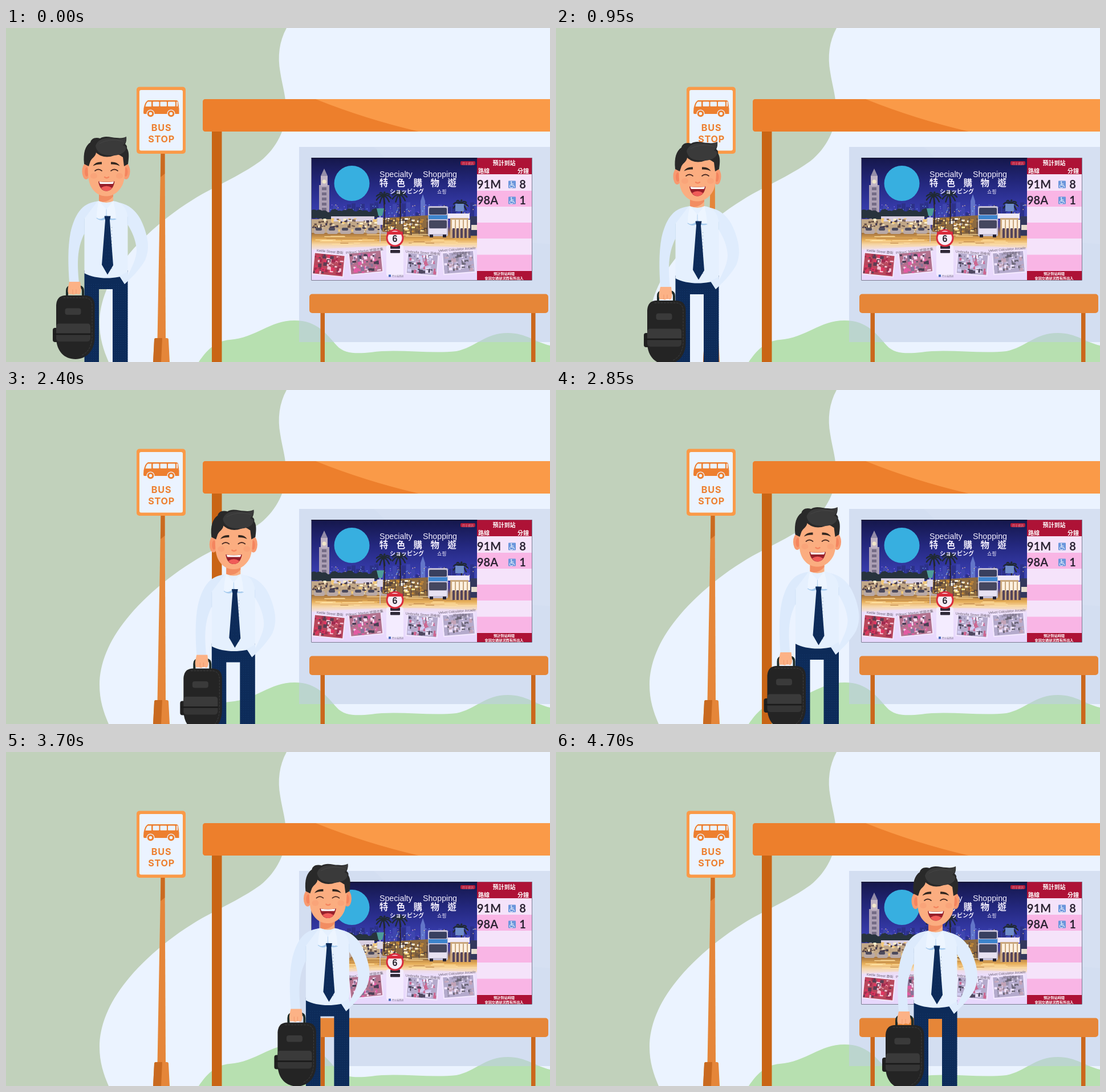
These frames come from a looping animation (954x587 px, 6000 ms). An HTML page with a canvas:

```html
<!DOCTYPE html>
<html lang="en">
<head>
<meta charset="utf-8">
<title>Bus stop</title>
<style>
html, body { margin: 0; width: 100%; height: 100%; overflow: hidden; background: #ebf3ff; }
canvas { display: block; width: 954px; height: 587px; }
</style>
</head>
<body>
<canvas id="stage" width="954" height="587"></canvas>
<script>
const W = 954, H = 587, LOOP = 6000, STEP = 50;
const stage = document.getElementById('stage').getContext('2d');
const scene = document.createElement('canvas');
scene.width = W;
scene.height = H;
let g = scene.getContext('2d');

const CJK = '"Noto Sans CJK TC", "Noto Sans CJK", "Noto Sans CJK JP", sans-serif';
const ARIAL = '"Liberation Sans", Arial, sans-serif';

function fill(d, color) {
  g.fillStyle = color;
  g.fill(new Path2D(d));
}
function line(d, color, width) {
  g.strokeStyle = color;
  g.lineWidth = width;
  g.lineCap = 'round';
  g.stroke(new Path2D(d));
}
function rect(x, y, w, h, color, r = 0) {
  g.fillStyle = color;
  g.beginPath();
  g.roundRect(x, y, w, h, r);
  g.fill();
}
function oval(x, y, rx, ry, color) {
  g.fillStyle = color;
  g.beginPath();
  g.ellipse(x, y, rx, ry, 0, 0, Math.PI * 2);
  g.fill();
}
function text(s, x, y, font, color, align = 'left', spacing = 0) {
  g.font = font;
  g.fillStyle = color;
  g.textAlign = align;
  g.letterSpacing = spacing + 'px';
  g.fillText(s, x, y);
}
function seeded(seed) {
  return () => (seed = (seed * 16807) % 2147483647) / 2147483647;
}
function vertical(y0, y1, ...stops) {
  const grad = g.createLinearGradient(0, y0, 0, y1);
  stops.forEach(([at, color]) => grad.addColorStop(at, color));
  return grad;
}

function drawLandscape() {
  rect(0, 0, W, H, '#ebf3ff');
  fill('M492 0C479 24 476 50 481 78C485 104 492 122 491 150C490 176 476 210 446 234C420 253 385 270 355 286C300 315 245 360 211 403C180 441 164 482 164 518C164 545 171 566 180 587H0V0Z', '#c1d1bb');
  fill('M338 587C352 566 368 550 392 548C440 544 462 514 506 514C546 514 562 538 580 558C594 574 618 572 640 570C685 563 740 573 790 568C824 561 840 536 880 536C912 536 930 553 954 558V587Z', '#b7e0b0');
}

function drawShelter() {
  rect(514, 209, 440, 343, 'rgba(190,203,228,.47)');
  fill('M514 209H645C690 250 760 340 860 366C900 376 925 378 954 380V552H514Z', 'rgba(190,206,232,.14)');
  rect(361, 180, 17.5, 407, '#c96515');
  rect(345, 125, 640, 57, '#fa9a48', 5);
  fill('M350 125H543Q630 160 724 182H350Q345 182 345 177V130Q345 125 350 125Z', '#ed7f2c');
}

function drawBench() {
  rect(551.5, 498, 7.5, 89, '#cb671b');
  rect(921, 498, 7.5, 89, '#cb671b');
  rect(532, 467.5, 419, 33.5, '#e68638', 5);
}

function drawSign() {
  const orange = '#ed7f2f', pale = '#ebf3ff';
  fill('M271.5 220H278.5L280 548H265.5Z', '#e58639');
  fill('M271.5 220H278.5V256L271 262Z', '#ca6a20');
  fill('M263 545H282Q285 545 285 548L287 587H258L260 548Q260 545 263 545Z', '#e58639');
  fill('M263 545H274L272 587H258L260 548Q260 545 263 545Z', '#c96a20');
  rect(229, 103.5, 86, 117.5, '#fa9a48', 5);
  rect(234, 109, 76, 106.5, pale, 3);
  fill('M249 127H298Q302 127 302 131L303.5 142V151H242Q241 151 241 148L241.5 141Q244 129 249 127Z', orange);
  fill('M249 129.5H255V138H244.5Q246 131 249 129.5Z', pale);
  [257.5, 270.5, 284].forEach((x, i) => rect(x, 129.5, [11, 11.5, 13][i], 8.2, pale, 1));
  rect(299, 129.5, 2, 8.2, pale);
  for (const x of [253.5, 289.5]) {
    oval(x, 150.5, 7, 7, pale);
    oval(x, 150.5, 5.8, 5.8, orange);
    oval(x, 150.5, 2.7, 2.7, pale);
  }
  text('BUS', 272.6, 181, '700 16.2px Inter, sans-serif', orange, 'center', .8);
  text('STOP', 272.6, 201, '700 16.2px Inter, sans-serif', orange, 'center', .8);
}

function palm(x, y, h) {
  line(`M${x} ${y}q3 ${h / 2} 1 ${h}`, '#2b2330', 2);
  for (let a = 0; a < 9; a++) {
    const dx = Math.cos(a * .7) * 13, dy = Math.sin(a * .7) * 10;
    line(`M${x} ${y}q${dx / 2} ${dy / 2 - 5} ${dx} ${dy + 3}`, '#202a32', 2.4);
  }
}

function drawThumb(x, y, w, h, turn, tones, label, lx, ly) {
  const rnd = seeded(x * 7 + 3);
  g.save();
  g.translate(x, y);
  g.rotate(turn);
  rect(-w / 2 - 2, -h / 2 - 2, w + 4, h + 4, '#f3e8ff');
  rect(-w / 2, -h / 2, w, h, tones[0]);
  for (let i = 0; i < 90; i++) {
    const bw = 2 + rnd() * 5, bh = 2 + rnd() * 5;
    rect(-w / 2 + rnd() * (w - bw), -h / 2 + rnd() * (h - bh), bw, bh, tones[i % tones.length]);
  }
  g.restore();
  g.save();
  g.translate(lx, ly);
  g.rotate(turn);
  text(label, 0, 0, `6px ${ARIAL}`, '#6b6070', 'center');
  g.restore();
}

function drawPhoto() {
  const rnd = seeded(91);
  g.save();
  g.beginPath();
  g.rect(536, 228.5, 290, 214.5);
  g.clip();
  rect(536, 228, 290, 215, vertical(228, 443, [0, '#15174a'], [.2, '#23277c'], [.46, '#3a3fb4'],
    [.56, '#4d4599'], [.62, '#a8763f'], [.67, '#e8b05a'], [.71, '#f6d6a8'], [.76, '#f0e2f6'], [1, '#dfcbf8']));

  for (let x = 566; x < 826; x += 8) {
    const h = 10 + rnd() * 22;
    rect(x, 338 - h, 7, h, rnd() > .5 ? '#3e46ae' : '#2c3189');
  }
  rect(727, 304, 8, 34, '#6275c8');
  fill('M727 304L731 292L735 304Z', '#6275c8');
  for (let i = 0; i < 150; i++) {
    rect(566 + rnd() * 258, 310 + rnd() * 29, 1.4, 1.4, ['#78a9f0', '#e7c488', '#8a66ee'][i % 3]);
  }

  rect(549, 276, 18, 62, '#ab9fb4');
  rect(552, 260, 12, 18, '#c0b3c4');
  fill('M552 260L558 247L564 260Z', '#938ca8');
  for (let y = 280; y < 330; y += 9) rect(554, y, 8, 5, '#756c86');
  oval(558, 270, 3.5, 3.5, '#f1e6cb');

  for (let x = 540; x < 650; x += 9) oval(x, 325 + rnd() * 8, 8, 8, '#27333d');
  rect(536, 336, 120, 24, '#c2a888');
  rect(570, 331, 76, 9, '#d8cfe2');
  for (let i = 0; i < 90; i++) {
    rect(537 + rnd() * 115, 334 + rnd() * 22, 2 + rnd() * 4, 1.5 + rnd() * 3, ['#fff0cc', '#6a5348', '#f2c878', '#453c50'][i % 4]);
  }
  for (let x = 540; x < 660; x += 23) {
    rect(x, 353, 19, 9, '#b9a9a6', 3);
    rect(x + 3, 351, 11, 5, '#4c4a5c', 2);
  }
  fill('M660 334L742 329V366L660 358Z', '#8d6a40');
  for (let i = 0; i < 80; i++) {
    rect(661 + rnd() * 78, 334 + rnd() * 24, 2 + rnd() * 5, 1 + rnd() * 3, ['#ffdf8a', '#51403a', '#f7efe0', '#c98c38'][i % 4]);
  }
  for (let x = 668; x < 742; x += 14) rect(x, 334, 1, 30, '#433846');
  for (let i = 0; i < 34; i++) {
    rect(540 + rnd() * 260, 361 + rnd() * 19, 16 + rnd() * 30, 1.2, i % 3 ? '#ffe0a0' : '#c18a4a');
  }

  palm(662, 296, 54);
  palm(690, 294, 50);
  palm(797, 310, 30);
  line('M656 318V376', '#cfc7da', 1.5);
  fill('M650 317H663L660 330H653Z', '#4c9d9a');
  rect(651, 333, 10, 13, '#dcd7e8');

  rect(740, 313, 35, 53, '#c4bfd6', 3);
  rect(742, 316, 31, 12, '#39405f', 2);
  rect(741, 329, 33, 7, '#3d84cc');
  rect(742, 338, 31, 14, '#45475f', 2);
  rect(742, 353, 31, 9, '#e8e2f2');
  rect(743, 363, 6, 5, '#262332');
  rect(766, 363, 6, 5, '#262332');
  rect(775, 326, 38, 9, '#efe8f8');
  rect(779, 334, 32, 35, '#c8a57c');
  for (let x = 782; x < 811; x += 7) {
    rect(x, 337, 5, 17, '#fdf0e0');
    rect(x + 1, 352, 4, 17, '#55445a');
  }
  rect(788, 309, 15, 13, '#6f8dca');
  rect(814, 331, 12, 34, '#33385d');
  rect(816, 346, 10, 9, '#e8dcce');

  fill('M536 390Q680 378 826 387V443H536Z', 'rgba(236,222,255,.65)');
  drawThumb(566, 416, 52, 36, .1, ['#b8485c', '#e03560', '#5c3c52', '#f6c5d6', '#a02c50'], 'Kettle Street 壺街', 568, 395);
  drawThumb(631, 412, 55, 36, -.1, ['#b3728e', '#e35ba3', '#4c4056', '#f6d8ee', '#8a7298'], 'Pillows’ Market 枕頭市集', 629, 394);
  drawThumb(730, 415, 52, 35, .08, ['#b5abcc', '#f0e6fc', '#4f4860', '#cd6690', '#d0cbf0'], 'Umbrella Street 雨傘街', 731, 397);
  drawThumb(794, 412, 53, 36, -.08, ['#b4aacc', '#f0e4fc', '#696475', '#c4a4b8', '#9992ac'], 'Velvet Calculator Arcade', 791, 391);
  text('絨絨電算商場', 799, 397, `5px ${CJK}`, '#6b6070', 'center');

  rect(667, 382, 30, 54, '#f4ecff', 3);
  rect(674, 382.5, 17, 5.5, '#2f2938', 1);
  rect(674, 390, 17, 5.5, '#2f2938', 1);
  rect(671, 433.5, 4, 4, '#4468b8');
  text('巴士站資訊', 677, 438, `4px ${CJK}`, '#665c77');
  oval(682, 369, 15.5, 15.5, '#d92b3c');
  oval(682, 369, 12.5, 12.5, '#f7edf6');
  rect(668, 358, 28, 5, '#d92b3c');
  text('6', 682, 376, `700 16px ${ARIAL}`, '#2b2530', 'center');

  oval(606.5, 273, 31, 31, '#37afe0');
  rect(797, 234, 26, 7, '#b41d3c', 2);
  text('巴士資訊', 810, 239.5, `5px ${CJK}`, '#e0a0b0', 'center');

  const white = '#f4f0ff';
  text('Specialty', 655, 261.5, `14.2px ${ARIAL}`, white);
  text('Shopping', 731, 261.5, `14.2px ${ARIAL}`, white);
  [...'特色購物遊'].forEach((c, i) => text(c, 662.5 + i * 29.9, 277.5, `700 15.5px ${CJK}`, white, 'center'));
  text('ショッピング', 673, 291, `700 10px ${CJK}`, white);
  text('쇼핑', 756, 290.5, `9px "Noto Sans CJK KR", ${CJK}`, white);
  g.restore();
}

function drawTimes() {
  const red = '#ae1236', ink = '#2c2433';
  rect(826, 228.5, 96, 214.5, '#f5e3fa');
  rect(826, 228.5, 96, 28.5, red);
  for (const y of [286, 342, 398.5]) rect(826, y, 96, 28, '#f9b5e5');
  rect(826, 427, 96, 16, red);
  text('預計到站', 873.5, 241, `700 10px ${CJK}`, '#fff', 'center');
  text('路線', 828, 254.5, `700 10px ${CJK}`, '#fff');
  text('分鐘', 917, 254.5, `700 10px ${CJK}`, '#fff', 'right');
  text('預計到站時間', 873.5, 434.2, `700 6.2px ${CJK}`, '#fff', 'center');
  text('會因交通狀況而有所出入', 873.5, 441.8, `700 6.2px ${CJK}`, '#fff', 'center');
  [['91M', '8', 282], ['98A', '1', 310]].forEach(([route, minutes, y]) => {
    text(route, 826, y, '700 20px Lato, sans-serif', ink);
    text(minutes, 906, y, '700 20px Lato, sans-serif', ink, 'center');
    rect(881, y - 13.5, 13, 13, '#6b96dc', 1);
    oval(886.2, y - 11.3, 1.1, 1.1, '#fff');
    line(`M886.2 ${y - 9.5}v4h4l1.5 3M886.2 ${y - 8}h3.5M884.6 ${y - 6.5}a3 3 0 1 0 4.4 3.6`, '#fff', 1);
  });
}

function drawDisplay() {
  rect(535.5, 228, 387, 215.5, '#241b35');
  drawPhoto();
  drawTimes();
  line('M536 228.8H826', '#15142e', 1.2);
}

function drawBag() {
  line('M107 474V462Q107 454.5 114 454.5H128Q135 454.5 135 462V474', '#1d2b28', 4);
  rect(82, 527, 14, 25, '#202020', 4);
  fill('M103 470H140Q155 471 155.5 487V545C155 568 140 582 122 582C102 582 89 568 88 546V487Q89 471 103 470Z', '#242424');
  g.setLineDash([3, 2.5]);
  line('M101 474H139Q150 475 151 487V545Q149 568 133 575', '#414141', .9);
  g.setLineDash([]);
  rect(103.5, 492.5, 28, 11.5, '#3a3a3a', 4);
  fill('M92 519.5H144Q148 520 148 525V536.5H88V525Q88 520 92 519.5Z', '#3a3a3a');
  fill('M88 539.5H148V546Q147 551 142 551H94Q89 551 88 546Z', '#353535');
  line('M84 538H148', '#1a1a1a', 2);
}

function drawBody() {
  const shirt = '#e5f0fe', navy = '#0d2b59';
  const legs = new Path2D('M137.5 426H213.5V640H187V459H163V640H137.5Z');
  g.fillStyle = navy;
  g.fill(legs);
  g.save();
  g.clip(legs);
  for (let y = 450; y < 600; y += 4) {
    for (let x = 139; x < 214; x += 4) rect(x + (y % 8 ? 2 : 0), y, .8, .8, '#1c4376');
  }
  g.restore();

  // right arm, with the open gap at the waist
  fill('M190 306C216 307 233 324 242 350C251 375 251 391 244 408C234 425 221 438 208 450L199 436L213 437C220 421 229 406 229 390C228 374 222 359 213 345Z', '#dfecfd');
  fill('M163 304Q176 308 188 304C202 306 212 314 213.5 334V433C192 442 157 442 137.5 431V340C137 320 146 306 163 304Z', shirt);
  fill('M160 305C132 307 120 330 113 360C108 386 109 418 111 447H128C125 415 124 388 137.5 361V335Z', '#dceafc');
  line('M137.5 336V362', '#cfe1f6', .8);
  line('M213.3 332V345', '#cfe1f6', .8);
  fill('M199 436L208 450L215 443L213.5 428Z', '#dfecfd');

  fill('M163 284H188V304Q176 310 163 304Z', '#f9b184');
  fill('M163 289Q176 299 188 289V296Q177 309 163 304Z', '#f28d62');
  fill('M158 334L176 329L194 336Q184 340 176 334Q168 342 158 334Z', '#a6cbee');
  fill('M163 304L176 319L174 331Q165 339 159 333Q159 318 163 304Z', '#edf5ff');
  fill('M188 304L176 319L178 331Q187 338 193 333Q192 318 188 304Z', '#edf5ff');
  line('M176 319V330', '#b2d1ef', 1);
  fill('M172.5 330.5H183.5L182 338L188 417L178 433.5L168 416L174 338Z', navy);
  for (let y = 350; y < 424; y += 6) {
    for (let x = 173; x < 185; x += 5) rect(x + (y % 12 ? 2 : 0), y, .8, .8, '#1c4376');
  }
}

function drawHead() {
  const skin = '#fbad80', blush = '#f4855f', hair = '#292929', brow = '#33271f';
  oval(140.5, 252, 7, 14, '#f89a70');
  oval(210.5, 252, 7, 14, '#f89a70');
  oval(141.5, 253, 3.5, 8, blush);
  oval(210, 253, 3.5, 8, blush);
  fill('M146 212H207C210 236 210 260 205 274C198 290 186 295.5 176 295.5C165 295.5 153 290 147 274C142 260 143 234 146 212Z', skin);
  oval(154, 260, 6, 5, 'rgba(245,130,95,.2)');
  oval(199, 260, 6, 5, 'rgba(245,130,95,.2)');
  fill('M137 239C135 219 139 207 148 201C149 195 156 191 165 194C174 188 185 193 194 193C202 194 207 193 211 191Q212 198 209 204Q213 207 212 211C217 219 215 230 214 239L207 243L205 227C199 224 197 220 190 224C176 229 166 226 158 219C157 226 151 228 148 234L145 243Z', hair);
  fill('M157 207C162 192 180 192 194 195Q205 196 211 191Q212 200 205 206Q212 208 210 213C207 223 190 226 174 223Q159 220 157 207Z', '#3a3a3a');
  line('M164 203Q181 193 205 199', '#454545', 1);
  fill('M152.5 242.5Q157 234.5 168 235.5V239.5Q159 239 152.5 242.5Z', brow);
  fill('M199.5 242.5Q195 234.5 184 235.5V239.5Q193 239 199.5 242.5Z', brow);
  line('M156 251Q162 246 168 251M184 251Q190 246 196 251', '#4a2b22', 1.7);
  line('M173 262Q176.5 265 180 262', blush, 2.4);
  fill('M162 269.5Q176 272 190.5 269.5C189 280 184 286.5 176 286.5C168 286.5 163 279 162 269.5Z', '#96202b');
  fill('M163.5 270Q176 272 189 270Q188.5 272.5 187.5 274H165Q164 272.5 163.5 270Z', '#fff');
  fill('M166.5 281Q176 274.5 186 281Q182 286.5 176 286.5Q170 286 166.5 281Z', '#f05b58');
}

function drawHand() {
  fill('M111 446H130L131.5 458Q132 467 128 468.5Q122 466 119 469Q115 467 110 468Q107.5 464 109 455Z', '#fcb286');
  line('M117 460V467M123 460V467', '#ef966b', .9);
}

function drawMan(x, y) {
  g.save();
  g.translate(x, y);
  drawBody();
  drawHead();
  drawBag();
  drawHand();
  g.restore();
}

// time, x, y along the walk
const walk = [
  [200, 0, 0], [950, 72, 9], [1550, 132, 15], [2200, 197, 21.5],
  [2850, 282.5, 15], [3450, 363, 4.5], [4700, 490, 10]
];
function place(t) {
  if (t <= walk[0][0]) return [0, 0];
  const i = walk.findIndex(k => t < k[0]);
  if (i < 0) return walk[walk.length - 1].slice(1);
  const a = walk[i - 1], b = walk[i], p = (t - a[0]) / (b[0] - a[0]);
  return [a[1] + (b[1] - a[1]) * p, a[2] + (b[2] - a[2]) * p];
}

drawLandscape();
drawShelter();
drawDisplay();
drawBench();
drawSign();
g = stage;

const start = performance.now();
function frame() {
  const t = (performance.now() - start) % LOOP;
  g.drawImage(scene, 0, 0);
  drawMan(...place(Math.floor(t / STEP) * STEP));
  requestAnimationFrame(frame);
}
frame();
</script>
</body>
</html>
```
